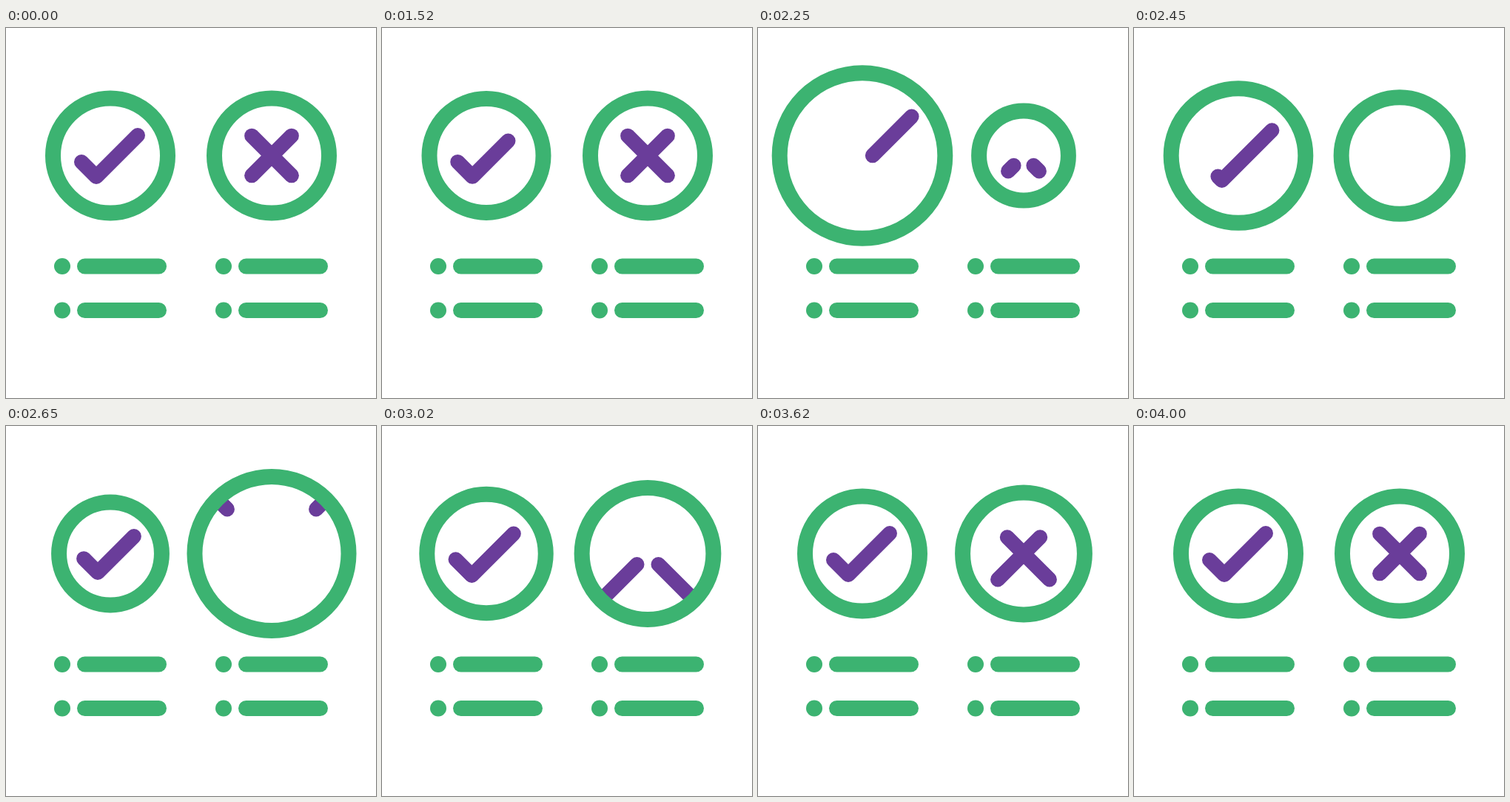
Write an HTML page with a canvas that moves like this. It is 500 px wide and 500 px high and loops after 4020 ms.

```html
<!DOCTYPE html>
<html lang="en">
<head>
<meta charset="utf-8">
<title>Check and cross lists</title>
<style>
  html, body { margin: 0; width: 100%; height: 100%; overflow: hidden; background: #fff; }
  canvas { display: block; width: 500px; height: 500px; }
</style>
</head>
<body>
<canvas id="stage" width="500" height="500"></canvas>
<script>
const ctx = document.getElementById('stage').getContext('2d');
const LOOP = 4020, START = 1520;
const GREEN = '#3cb371', PURPLE = '#6a3d9a';
const RADIUS = 77.5, CY = 172.5, DIAG = Math.SQRT1_2;
const LEG = 20 / DIAG, CHECK = 76 / DIAG, ARM = 38;

// Smooth curve through [time, value] keys, flat at every peak and trough.
function track(keys) {
  const last = keys.length - 1;
  const slope = i => (keys[i + 1][1] - keys[i][1]) / (keys[i + 1][0] - keys[i][0]);
  const tangents = keys.map((_, i) => {
    if (i === 0 || i === last) return 0;
    const a = slope(i - 1), b = slope(i);
    return a * b > 0 ? 2 * a * b / (a + b) : 0;
  });
  return t => {
    if (t <= keys[0][0]) return keys[0][1];
    if (t >= keys[last][0]) return keys[last][1];
    let i = 0;
    while (t > keys[i + 1][0]) i++;
    const [t0, v0] = keys[i], [t1, v1] = keys[i + 1];
    const d = t1 - t0, u = (t - t0) / d, w = 1 - u;
    return w * w * ((1 + 2 * u) * v0 + u * d * tangents[i])
         + u * u * ((3 - 2 * u) * v1 - w * d * tangents[i + 1]);
  };
}

const leftScale = track([[1495, 1], [1520, 0.994], [1800, 0.76], [2020, 1.28], [2235, 1.445],
  [2670, 0.893], [3020, 1.035], [3115, 1.065], [3500, 1]]);
const rightScale = track([[2000, 1], [2250, 0.78], [2300, 0.755], [2570, 1.275], [2650, 1.342],
  [2770, 1.385], [3020, 1.148], [3210, 0.89], [3645, 1.065], [3980, 1]]);

const checkTail = track([[1880, 0], [2080, 38], [2240, 69], [2450, 22], [2640, -1.5], [3020, -1.5], [3500, 0]]);
const checkErase = track([[1495, CHECK], [1520, CHECK - 10], [1800, 0]]);
const checkEnter = track([[1800, 0], [1900, 55], [2050, 114], [2240, 120.5], [2450, 110],
  [2640, 105.5], [3020, 105.5], [3500, CHECK]]);

const crossErase = track([[2000, -ARM], [2020, -32], [2250, 24], [2300, ARM]]);
const crossShift = track([[2450, -230], [2650, -102], [2780, 5], [2930, 64], [3020, 56],
  [3210, 2], [3340, -8], [3630, 8.5], [3950, 0]]);

function stroke(points, width, color) {
  ctx.beginPath();
  points.forEach(([x, y]) => ctx.lineTo(x, y));
  ctx.lineWidth = width;
  ctx.strokeStyle = color;
  ctx.stroke();
}

function badge(cx, scale, drawMark) {
  ctx.save();
  ctx.beginPath();
  ctx.arc(cx, CY, RADIUS * scale, 0, 2 * Math.PI);
  ctx.clip();
  drawMark((x, y) => [cx + x * scale, CY + y * scale]);
  ctx.restore();
  ctx.beginPath();
  ctx.arc(cx, CY, RADIUS * scale, 0, 2 * Math.PI);
  ctx.lineWidth = 21;
  ctx.strokeStyle = GREEN;
  ctx.stroke();
}

function drawCheck(t, place) {
  const tail = checkTail(t);
  const head = t < 1800 ? checkErase(t) : checkEnter(t);
  if (head - tail < 0.5) return;
  const at = s => place(-19 + (s - LEG) * DIAG, 28.5 - Math.abs(s - LEG) * DIAG);
  const points = [at(tail)];
  if (tail < LEG && head > LEG) points.push(at(LEG));
  points.push(at(head));
  stroke(points, 20, PURPLE);
}

function drawCross(t, place) {
  const erasing = t < 2400;
  const shift = erasing ? 0 : crossShift(t);
  const tail = erasing ? crossErase(t) : shift - ARM;
  const head = shift + ARM;
  if (head - tail < 0.5) return;
  for (const side of [-1, 1]) {
    const at = s => place(side * s * DIAG, s * DIAG);
    stroke([at(tail), at(head)], 20, PURPLE);
  }
}

function drawList(x) {
  for (const y of [322, 381.5]) {
    ctx.beginPath();
    ctx.arc(x, y, 11, 0, 2 * Math.PI);
    ctx.fillStyle = GREEN;
    ctx.fill();
    stroke([[x + 30.5, y], [x + 130.5, y]], 21, GREEN);
  }
}

function render(now) {
  const loopTime = now % LOOP;
  const t = loopTime < START ? 0 : loopTime;
  ctx.fillStyle = '#fff';
  ctx.fillRect(0, 0, 500, 500);
  badge(141, leftScale(t), place => drawCheck(t, place));
  badge(359, rightScale(t), place => drawCross(t, place));
  drawList(76);
  drawList(294);
}

ctx.lineCap = ctx.lineJoin = 'round';
const begin = performance.now();
function tick() {
  render(performance.now() - begin);
  requestAnimationFrame(tick);
}
tick();
</script>
</body>
</html>
```
